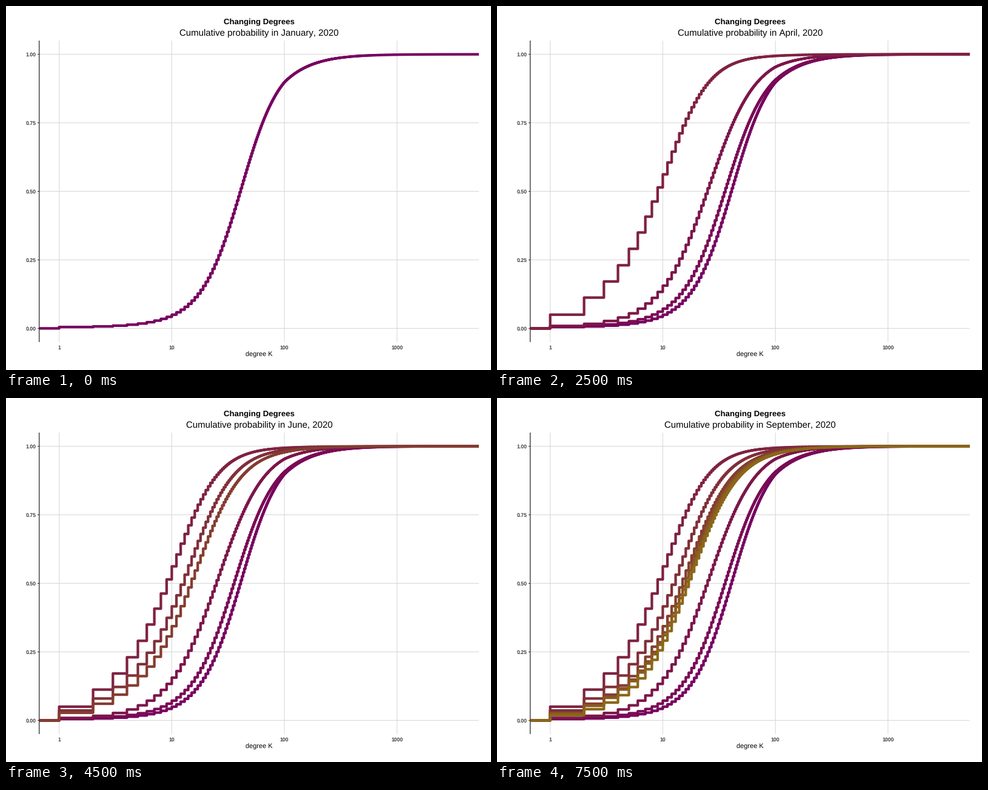
Recreate the animation shown at these times as a matplotlib script. Size 800 px wide and 600 px high, loop 8000 ms.

```python
import numpy as np
import matplotlib.pyplot as plt
from matplotlib.animation import FuncAnimation

W, H, DPI = 800, 600, 100
PT = 72 / DPI  # points per pixel
LEFT, RIGHT, TOP, BOTTOM = 55, 780, 57, 554
X1, DECADE = 87.7, 185.75
Y0, Y_SPAN = 531.4, 451.8

NAMES = ["January", "February", "March", "April", "May",
         "June", "July", "August", "September"]
TAIL_START, TAIL_SLOPE = np.log(100), 1.9

# Cumulative probability at degrees 1, 3, 10, 30 and 100
KEYS = {
    "January": (.005, .010, .050, .335, .899),
    "February": (.006, .0145, .072, .412, .907),
    "March": (.009, .027, .156, .602, .954),
    "April": (.050, .171, .562, .929, .994),
    "September": (.019, .065, .291, .762, .971),
}
# How far each month has moved from the April curve to the September one
RECOVERY = {"May": .34, "June": .61, "July": .70, "August": .74}


def x_px(k):
    return X1 + DECADE * np.log10(k)


def y_px(p):
    return Y0 - Y_SPAN * p


def sigmoid(v):
    return 1 / (1 + np.exp(-v))


def key_logit(month, u):
    """Log-odds at log-degree u: quartic through the keys, then a straight tail."""
    p = np.array(KEYS[month])
    fit = np.polyfit(np.log([1, 3, 10, 30, 100]), np.log(p / (1 - p)), 4)
    tail = TAIL_SLOPE * np.maximum(u - TAIL_START, 0)
    return np.polyval(fit, np.minimum(u, TAIL_START)) + tail


def month_logit(month, u):
    if month in KEYS:
        return key_logit(month, u)
    # High degrees recover a little further than low ones
    share = RECOVERY[month] + .2 * sigmoid((u - 1.7) / .3)
    return (1 - share) * key_logit("April", u) + share * key_logit("September", u)


def step_curve(month):
    """Pixel path of the cumulative step function."""
    k = np.arange(1, 5400)
    k = k[x_px(k) < RIGHT]
    y = y_px(sigmoid(month_logit(month, np.log(k))))
    return np.r_[LEFT, x_px(k), RIGHT], np.r_[Y0, y, y[-1]]


def shade(t):
    """Purple to dark gold."""
    return (119 + 20 * t) / 255, 103 * t ** 1.12 / 255, (95 - 70 * t ** .87) / 255


plt.rcParams["font.family"] = "Liberation Sans"
plt.rcParams["text.hinting"] = "none"
plt.rcParams["text.kerning_factor"] = 6

fig = plt.figure(figsize=(W / DPI, H / DPI), dpi=DPI, facecolor="white")
ax = fig.add_axes([0, 0, 1, 1])
ax.set_xlim(0, W)
ax.set_ylim(H, 0)
ax.axis("off")


def label(x, y, text, size, **style):
    style = {"ha": "center", "va": "baseline", **style}
    return ax.text(x, y, text, fontsize=size * PT, **style)


def rule(xs, ys, color, width=1):
    ax.plot(xs, ys, color=color, lw=width * PT, solid_capstyle="butt",
            snap=False, zorder=1)


TICK = {"size": 8.8, "weight": "bold", "color": "#444444"}
GRID = "#d6d6d6"

for k in (1, 10, 100, 1000):
    rule([x_px(k)] * 2, [TOP, BOTTOM], GRID)
    label(x_px(k), 566, str(k), **TICK)
for p in (0, .25, .5, .75, 1):
    rule([LEFT, RIGHT], [y_px(p)] * 2, GRID)
    rule([52, LEFT], [y_px(p)] * 2, "#333333")
    label(50, y_px(p) + 3.3, f"{p:.2f}", ha="right", **TICK)
rule([54.8, 54.8], [TOP, BOTTOM], "black", 1.07)

mid = (LEFT + RIGHT) / 2
label(mid, 30.3, "Changing Degrees", 13.2, weight="bold")
subtitle = label(mid, 49.3, "", 15)
label(mid, 578, "degree K", 11)

curves = []
for n, month in enumerate(NAMES):
    line, = ax.plot(*step_curve(month), color=shade(n / (len(NAMES) - 1)),
                    lw=4.27 * PT, drawstyle="steps-post",
                    solid_capstyle="butt", solid_joinstyle="round",
                    snap=False, zorder=3 + n)
    curves.append(line)


def draw(frame):
    # The first month is held for one half-second, later ones for two
    current = (frame + 1) // 2
    for n, line in enumerate(curves):
        line.set_visible(n <= current)
    subtitle.set_text(f"Cumulative probability in {NAMES[current]}, 2020")
    return [*curves, subtitle]


anim = FuncAnimation(fig, draw, frames=16, interval=500, repeat=True,
                     repeat_delay=0, blit=False)
plt.show()
```
